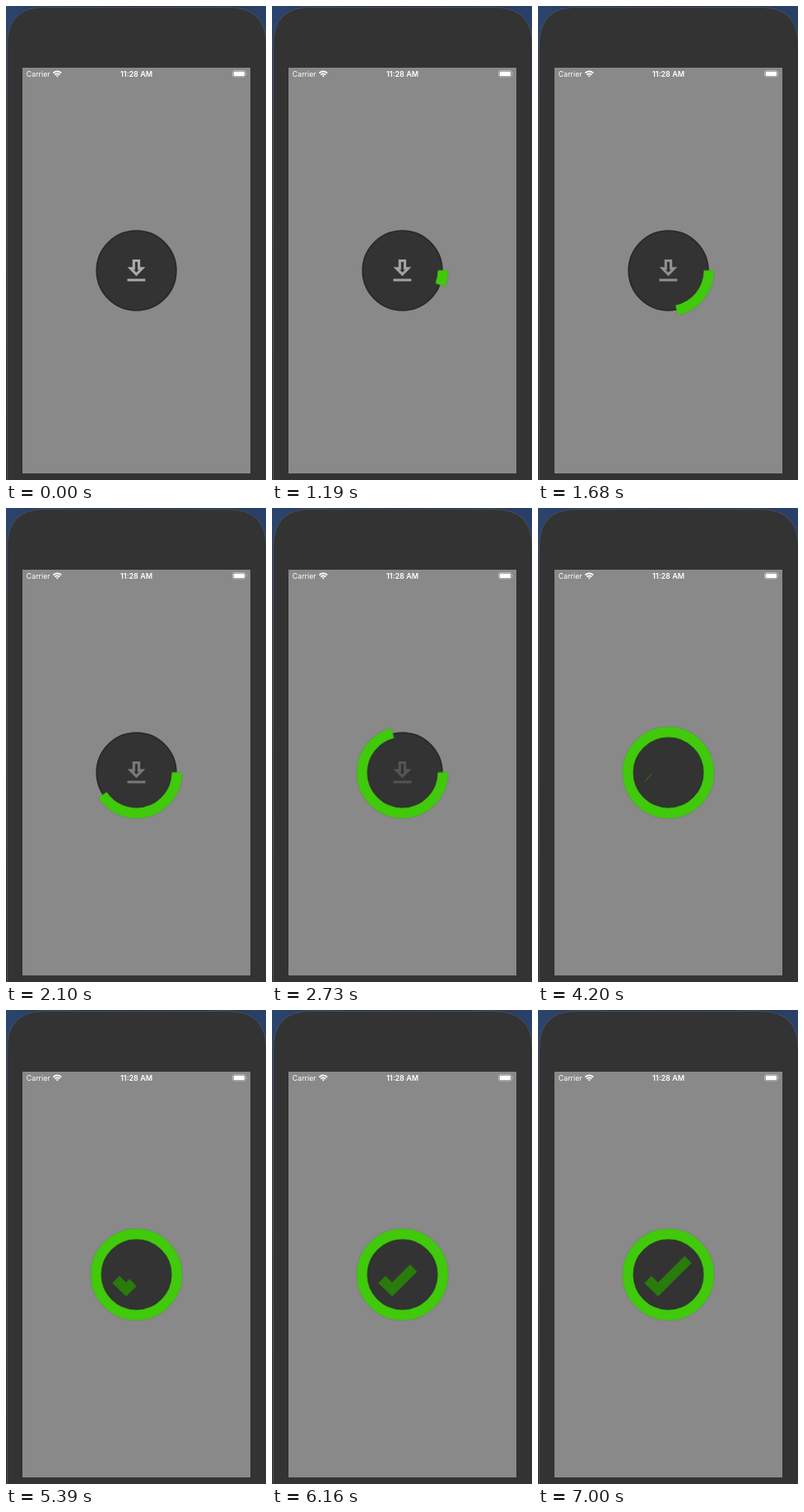
An HTML page that plays this animation: 316 px wide and 576 px high, repeating every 7.35 s.

```html
<!DOCTYPE html>
<html lang="en">
<head>
<meta charset="utf-8">
<title>Download button</title>
<style>
  html, body { margin: 0; width: 100%; height: 100%; overflow: hidden; background: #333; }
  svg { display: block; width: 316px; height: 576px; }
  text { font-family: Inter, Roboto, sans-serif; fill: #fff; }
  .ring { fill: none; stroke: #40ca0b; stroke-width: 12; filter: drop-shadow(0 0 1.2px #3f9c28); }
  .tick { fill: none; stroke: #297b0b; stroke-width: 12.2; }
</style>
</head>
<body>
<svg viewBox="0 0 316 576">
  <defs>
    <linearGradient id="sky" x2="1" y2="0">
      <stop offset="0" stop-color="#2b456e"/>
      <stop offset=".5" stop-color="#1c2c4b"/>
      <stop offset="1" stop-color="#29416a"/>
    </linearGradient>
    <linearGradient id="edge" x2="0" y2="1">
      <stop offset="0" stop-color="#233a60"/>
      <stop offset=".25" stop-color="#3b3d44"/>
      <stop offset="1" stop-color="#292a2d"/>
    </linearGradient>
  </defs>

  <rect width="316" height="576" fill="url(#edge)"/>
  <rect width="316" height="50" fill="url(#sky)"/>
  <path d="M1.5 580V48Q1.5 1.5 46 1.5H270Q316.5 1.5 316.5 48V580Z" fill="#333" stroke="#4a4f59"/>
  <rect x="20" y="75" width="277" height="493" fill="#898989"/>

  <text x="24.8" y="85.8" font-size="8.8">Carrier</text>
  <text x="158.5" y="85.8" font-size="9" font-weight="600" text-anchor="middle">11:28 AM</text>
  <g fill="none" stroke="#fff" stroke-width="1.7">
    <path d="M57.4 81.5Q62.3 77.2 67.2 81.5M59.3 83.6Q62.3 81.1 65.3 83.6"/>
    <path d="M60.7 84.8Q62.3 83.6 63.9 84.8L62.3 86.6Z" fill="#fff" stroke="none"/>
  </g>
  <rect x="275.5" y="78.6" width="15.6" height="7.4" rx="2" fill="none" stroke="#c4c4c4" stroke-width=".8"/>
  <rect x="276.7" y="79.7" width="13.2" height="5.2" rx="1" fill="#fff"/>
  <path d="M292.3 81Q293.8 82.3 292.3 83.6Z" fill="#c4c4c4"/>

  <circle cx="158.5" cy="321.5" r="48.3" fill="#333" stroke="#292929" stroke-width="1.8"/>
  <path id="arrow" fill="#aaa" fill-rule="evenodd" transform="translate(139.7 303.3) scale(1.56)"
    d="M19 9h-4V3H9v6H5l7 7 7-7zm-8 2V5h2v6h1.17L12 13.17 9.83 11H11zm-6 7h14v2H5z"/>
  <circle id="shade" cx="158.5" cy="321.5" r="42.4" fill="none" stroke="#292929" stroke-width="2" pathLength="1"/>
  <circle id="ring" class="ring" cx="158.5" cy="321.5" r="49.2" pathLength="1"/>
  <path id="tick" class="tick" d="M133.5 327.5L146 339.5L182.7 303" pathLength="1"/>
</svg>
<script>
  const LOOP = 7350, STEP = 70, LAST = 7000, DURATION = 3180;
  const [arrow, shade, ring, tick] = ['arrow', 'shade', 'ring', 'tick'].map(id => document.getElementById(id));

  function progress(time, start) {
    const p = Math.min(1, Math.max(0, (time - start) / DURATION));
    return (1 - Math.cos(Math.PI * p)) / 2;
  }

  function reveal(shape, amount) {
    shape.style.visibility = amount > 0 ? 'visible' : 'hidden';
    shape.style.strokeDasharray = amount < 1 ? `${amount} 2` : 'none';
  }

  function draw(now) {
    const time = Math.min(LAST, Math.floor(now % LOOP / STEP) * STEP);
    const loaded = progress(time, 700);
    reveal(ring, loaded);
    reveal(shade, loaded);
    reveal(tick, progress(time, 3960));
    arrow.style.opacity = 1 - loaded;
  }

  let origin;
  function frame(now) {
    origin ??= now;
    draw(now - origin);
    requestAnimationFrame(frame);
  }
  draw(0);
  requestAnimationFrame(frame);
</script>
</body>
</html>
```
